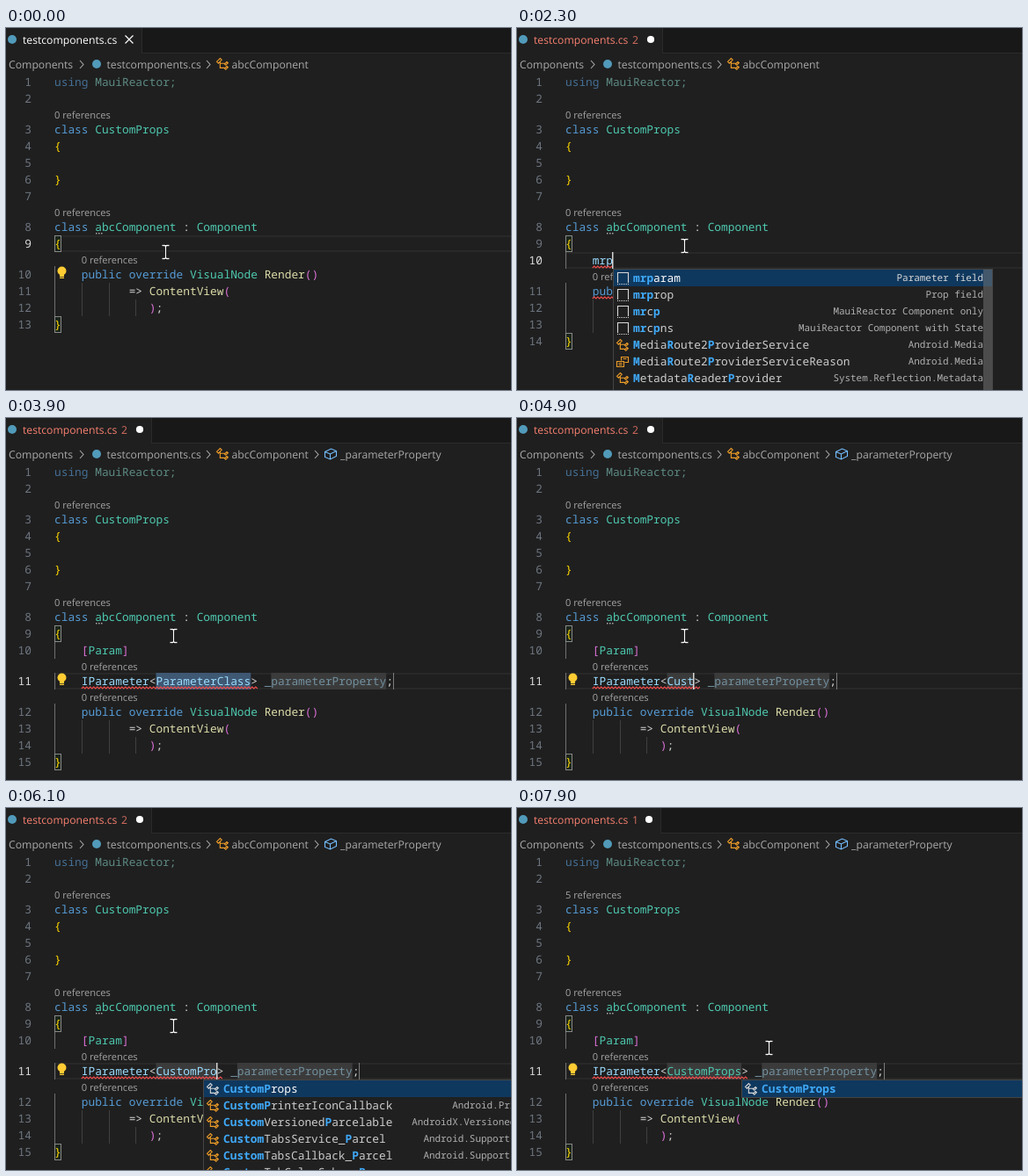
Recreate the animation shown at these times as an HTML page. Size 574 by 412 pixels, loop 8000 ms.

```html
<!DOCTYPE html>
<html lang="en">
<head>
<meta charset="utf-8">
<title>Code editor</title>
<style>
  html, body { margin: 0; width: 100%; height: 100%; overflow: hidden; background: #1f1f1f; }
  svg { display: block; }
  text { white-space: pre; text-rendering: geometricPrecision; }
  .code { font: 500 12.83px "Noto Sans Mono", "DejaVu Sans Mono", monospace; }
  .code.hit { font-weight: 700; }
  .detail { font: 500 10.95px "Noto Sans Mono", "DejaVu Sans Mono", monospace; text-anchor: end; }
  .ui { font: 12.2px "Open Sans", "Noto Sans", sans-serif; }
  .lens { font: 11.1px "Open Sans", "Noto Sans", sans-serif; fill: #a2a2a2; }
</style>
</head>
<body>
<svg id="stage" width="574" height="412" viewBox="0 0 574 412"></svg>
<script>
const LOOP = 8000, LEFT = 55, CHAR = 7.698, ROW = 19, LENS = 16;
const ACCEPT = 3100, PARSED = 3500, ERRORS = 1800;
const stage = document.getElementById('stage');

const colors = {
  k: '#569cd6', t: '#4ec9b0', y: '#ffd700', p: '#da70d6', m: '#dcdcaa',
  v: '#9cdcfe', w: '#d4d4d4', u: '#456f94', n: '#5d8a82', d: '#72909f'
};

// [time, word being typed]; every entry restarts the caret blink
const typed = [
  [-800, ''], [1200, ''], [1500, 'm'], [1700, 'mr'], [2200, 'mrp'], [2600, 'mrpa'], [2800, 'mrpar'],
  [ACCEPT, 'ParameterClass'], [4600, 'C'], [4700, 'Cu'], [4800, 'Cus'], [4900, 'Cust'], [5100, 'Custo'],
  [5400, 'Custom'], [5600, 'CustomP'], [5800, 'CustomPr'], [6100, 'CustomPro'],
  [6300, 'CustomProp'], [6400, 'CustomProps']
];

// [time, anchor column, query]
const popups = [
  [0], [1700, 6, 'mr'], [2200, 7, 'mrp'], [2600, 8, 'mrpa'], [2800, 9, 'mrpar'], [ACCEPT],
  [5100, 20, 'Custo'], [5400, 21, 'Custom'], [5600, 22, 'CustomP'], [6600, 26, 'CustomProps']
];

// [icon, label, detail]
const suggestions = [
  ['snippet', 'mrparam', 'Parameter field'],
  ['snippet', 'mrprop', 'Prop field'],
  ['snippet', 'mrcp', 'MauiReactor Component only'],
  ['snippet', 'mrcpns', 'MauiReactor Component with State'],
  ['class', 'MediaRoute2ProviderService', 'Android.Media'],
  ['enum', 'MediaRoute2ProviderServiceReason', 'Android.Media'],
  ['class', 'MetadataReaderProvider', 'System.Reflection.Metadata'],
  ['class', 'CustomProps', ''],
  ['class', 'CustomPrinterIconCallback', 'Android.PrintServices'],
  ['class', 'CustomVersionedParcelable', 'AndroidX.VersionedParcelable'],
  ['class', 'CustomTabsService_Parcel', 'Android.Support.CustomTabs'],
  ['class', 'CustomTabsCallback_Parcel', 'Android.Support.CustomTabs'],
  ['class', 'CustomTabColorSchemeParams', '']
];

const last = (list, t) => list.filter(e => e[0] <= t).pop();
const colX = col => LEFT + col * CHAR;
const esc = s => s.replace(/&/g, '&amp;').replace(/</g, '&lt;');
const rect = (x, y, w, h, fill, extra = '') =>
  `<rect x="${x}" y="${y}" width="${w}" height="${h}" fill="${fill}" ${extra}/>`;
const path = (d, stroke, width = 1, extra = '') =>
  `<path d="${d}" fill="none" stroke="${stroke}" stroke-width="${width}" ${extra}/>`;
const text = (cls, x, y, s, fill, extra = '') =>
  `<text class="${cls}" x="${x}" y="${y}" ${fill ? `fill="${fill}"` : ''} ${extra}>${esc(s)}</text>`;

// Tokens are split by "|"; the first letter of each picks its colour.
function code(source, y) {
  let col = 0;
  return source.split('|').map(token => {
    const s = token.slice(1), x = colX(col);
    col += s.length;
    return s.trim() ? text('code', x, y, s, colors[token[0]]) : '';
  }).join('');
}

function squiggle(col, length, top) {
  const x = colX(col), end = x + length * CHAR;
  let d = `M${x} ${top + 18}`;
  for (let i = 1; x + i * 2 <= end; i++) d += `L${x + i * 2} ${top + (i % 2 ? 16 : 18)}`;
  return path(d, '#f14c4c', 1.1);
}

// Icons are drawn on a 16 px grid centred on (x, y).
const icon = (d, x, y, color, extra = '') =>
  path(d, color, 1.1, `transform="translate(${x - 8} ${y - 8})" ${extra}`);
const icons = {
  class: (x, y, c) => icon('M1.5 5.35L5.35 1.5l1.85 1.85L3.35 7.2zM5.35 5.5v6.85h5M5.35 7.3h5.3' +
    'M13 5.5l1.3 1.2l-2.6 2.6l-1.3 -1.2zm0 5l1.3 1.2l-2.6 2.6l-1.3 -1.2z', x, y, c),
  enum: (x, y, c) => icon('M6.5 6.5v-4h8v6h-4M1.5 7.5h8v6h-8zM8.5 4.5h4M3.5 9.5h4M3.5 11.5h4', x, y, c),
  snippet: (x, y, c) => icon('M2.5 13v-11.5h12v11.5', x, y, c) +
    icon('M2 14.5h13', x, y, c, 'stroke-dasharray="1 1"'),
  field: (x, y) => icon('M1.5 5.5l7 -3.5l6 2.5v6l-7 3.5l-6 -2.5zl6 2.5l7 -3.5M7.5 8v6', x, y, '#75beff')
};

const chevron = x => path(`M${x - 2} 37l4 4.5l-4 4.5`, '#a9a9a9', 1.1);
const badge = (x, y) => `<circle cx="${x}" cy="${y}" r="5" fill="#519aba"/>`;
const bulb = top => `<circle cx="63.5" cy="${top + 5.5}" r="5" fill="#ffcc33"/>` +
  rect(61, top + 9, 5, 3, '#ffcc33') + rect(61, top + 12.7, 5, 1.3, '#ffcc33');

function documentLines(t, word) {
  const inserted = t >= 1200, accepted = t >= ACCEPT, parsed = t >= PARSED;
  const lines = [
    { src: 'uusing |nMauiReactor;' },
    { src: 'w' },
    { src: 'kclass |tCustomProps', lens: t >= 6700 ? '5 references' : '0 references', lensCol: 0 },
    { src: 'y{' }, { src: 'w' }, { src: 'y}' }, { src: 'w' },
    { src: 'kclass |tabcComponent|w : |tComponent', lens: '0 references', lensCol: 0 },
    { src: 'y{', brace: true }
  ];
  if (accepted) {
    lines.push({ src: 'w    |p[|tParam|p]', guides: 1, errors: parsed ? [] : [4, 7] });
    lines.push({
      src: `w    |vIParameter|w<|${word === 'CustomProps' ? 't' : 'v'}${word}|w> |${parsed ? 'd' : 'v'}_parameterProperty|w;`,
      guides: 1, errors: [4, 12 + word.length], field: true,
      lens: parsed ? '0 references' : '', lensCol: 4
    });
  } else if (inserted) {
    lines.push({ src: 'w    |v' + word, guides: 1, errors: t >= ERRORS ? [4, word.length] : [] });
  }
  lines.push(
    { src: 'w    |kpublic override |tVisualNode |mRender|p()', guides: 1, lens: '0 references', lensCol: 4,
      errors: t >= ERRORS && !accepted ? [4, 6] : [] },
    { src: 'w           |w=> |mContentView|p(', guides: 3 },
    { src: 'w              |p)|w;', guides: 4 },
    { src: 'y}', brace: true }
  );
  let y = 52;
  for (const line of lines) {
    if (line.lens) y += LENS;
    line.top = y;
    y += ROW;
  }
  return lines;
}

function drawEditor(t) {
  const [keyTime, word] = last(typed, t);
  const lines = documentLines(t, word);
  const active = t < 1200 ? 8 : t < ACCEPT ? 9 : 10;
  const top = lines[active].top;
  const selecting = t >= ACCEPT && t < 4600;
  let out = rect(LEFT + 1, top + 1, 540, ROW - 2, 'none', 'stroke="#282828" stroke-width="2"');

  lines.forEach((line, i) => {
    const y = line.top;
    for (let g = 0; g < (line.guides || 0); g++)
      out += rect(Math.round(colX(g * 4)), y, 1, ROW, g ? '#404040' : '#707070');
    if (line.brace) out += rect(LEFT + .5, y + .5, 7, 18, '#1c261c', 'stroke="#888"');
    if (line.field) {
      const end = 15 + word.length;
      out += rect(colX(15), y, word.length * CHAR, ROW, selecting ? '#3f5873' : '#3b3b3b');
      out += rect(colX(end + 3), y, 17 * CHAR, ROW, '#3b3b3b');
      out += rect(Math.round(colX(end + 21)), y, 1, ROW, '#7c7c7c');
    }
    if (line.lens) out += text('lens', colX(line.lensCol), y - 3, line.lens);
    out += text('code', 29, y + 14, String(i + 1), i === active ? '#ddd' : '#6e7681', 'text-anchor="end"');
    out += code(line.src, y + 14);
    if (line.errors && line.errors[1]) out += squiggle(...line.errors, y);
  });

  for (let i = 0; i < 3; i++) out += rect(102 + i * 3, 233, 1.5, 1.5, '#aaa');
  if (Math.floor((t - keyTime) / 500) % 2 === 0) {
    const col = t < 1200 ? 1 : (t < ACCEPT ? 4 : 15) + word.length;
    out += rect(Math.round(colX(col)) - (t < 1200 ? 0 : 1), top, 1.5, ROW, '#d4d4d4');
  }
  if (t < 1200) out += bulb(lines[9].top);
  else if (t < 1500 || t >= PARSED) out += bulb(top);
  return out;
}

function drawHeader(t) {
  const count = t < ERRORS ? '' : t < 6400 ? '2' : '1';
  const width = { '': 154, 2: 165, 1: 163 }[count];
  const tint = count ? '#f88070' : '#fff';
  const mark = width - (count ? 13 : 14);
  let out = rect(width, 0, 574 - width, 28, '#181818') +
    rect(width, 0, 1, 28, '#2b2b2b') + rect(width, 28, 574 - width, 1, '#2b2b2b');
  out += badge(7, 13) + text('ui', 19, 17.5, 'testcomponents.cs', tint);
  if (count) out += text('ui', 131, 17.5, count, '#d96f61');
  out += t < 1200
    ? path(`M${mark - 4.5} 8.5l9 9m0 -9l-9 9`, '#fff', 1.2)
    : `<circle cx="${mark}" cy="13" r="4.1" fill="#fff"/>`;

  const crumb = (x, s) => text('ui', x, 46, s, '#a9a9a9');
  out += crumb(3, 'Components') + chevron(86) + badge(103, 41) + crumb(114.5, 'testcomponents.cs') +
    chevron(230) + icons.class(246, 41, '#ee9d28') + crumb(256.5, 'abcComponent');
  if (t >= PARSED) out += chevron(353) + icons.field(369, 41) + crumb(380, '_parameterProperty');
  return out;
}

// Indices of the label letters that match the query in order, or null.
function match(label, query) {
  const hits = [];
  let from = 0;
  for (const c of query.toLowerCase()) {
    const i = label.toLowerCase().indexOf(c, from);
    if (i < 0) return null;
    hits.push(i);
    from = i + 1;
  }
  return hits[0] === 0 ? hits : null;
}

function drawPopup(t) {
  const [, col, query] = last(popups, t);
  if (!query) return '';
  const x = Math.round(colX(col)), y = t < ACCEPT ? 274 : 309, width = 432;
  const rows = suggestions.filter(s => match(s[1], query));
  const long = rows.length > 5;
  const height = long ? 230 : rows.length * ROW + 2;
  let out = rect(x + .5, y + .5, width - 1, height - 1, '#202020', 'stroke="#454545"');
  rows.forEach(([kind, label, detail], i) => {
    const top = y + 1 + i * ROW, hits = match(label, query);
    if (!i) out += rect(x + 1, top, width - 2, ROW, '#0f385e');
    const tint = kind === 'snippet' || !i ? '#d8d8d8' : '#ee9d28';
    out += icons[kind](x + 11, top + 10, tint);
    [...label].forEach((c, k) => {
      const hit = hits.includes(k);
      out += text(hit ? 'code hit' : 'code', x + 23 + k * CHAR, top + 14, c,
        hit ? '#3fa9f8' : i ? '#ccc' : '#fff');
    });
    out += text('detail', x + width - 11, top + 13, detail, i ? '#b0b0b0' : '#d8d8d8');
  });
  if (long) out += rect(x + width - 11, y + 1, 10, 180, 'rgba(121,121,121,.5)');
  return out;
}

function drawMouse(t) {
  const steps = (start, n) => Math.max(0, Math.min(1, (Math.floor((t - start) / 100) + 1) / n));
  const a = steps(400, 2), b = steps(6900, 6);
  const x = 181.5 + 9 * a + 96 * b, y = 255 - 7 * a + 25 * b;
  const d = `M${x - 4} ${y - 7.5}h3l1 1l1 -1h3M${x} ${y - 6.5}v13M${x - 4} ${y + 7.5}h3l1 -1l1 1h3`;
  return path(d, '#000', 3) + path(d, '#fff', 1.3);
}

let shown = '';
function frame(now) {
  const t = now % LOOP;
  const picture = rect(0, 0, 574, 412, '#1f1f1f') + drawEditor(t) + drawHeader(t) + drawPopup(t) + drawMouse(t);
  if (picture !== shown) stage.innerHTML = shown = picture;
}

const start = performance.now();
function tick() {
  frame(performance.now() - start);
  requestAnimationFrame(tick);
}
tick();
</script>
</body>
</html>
```
